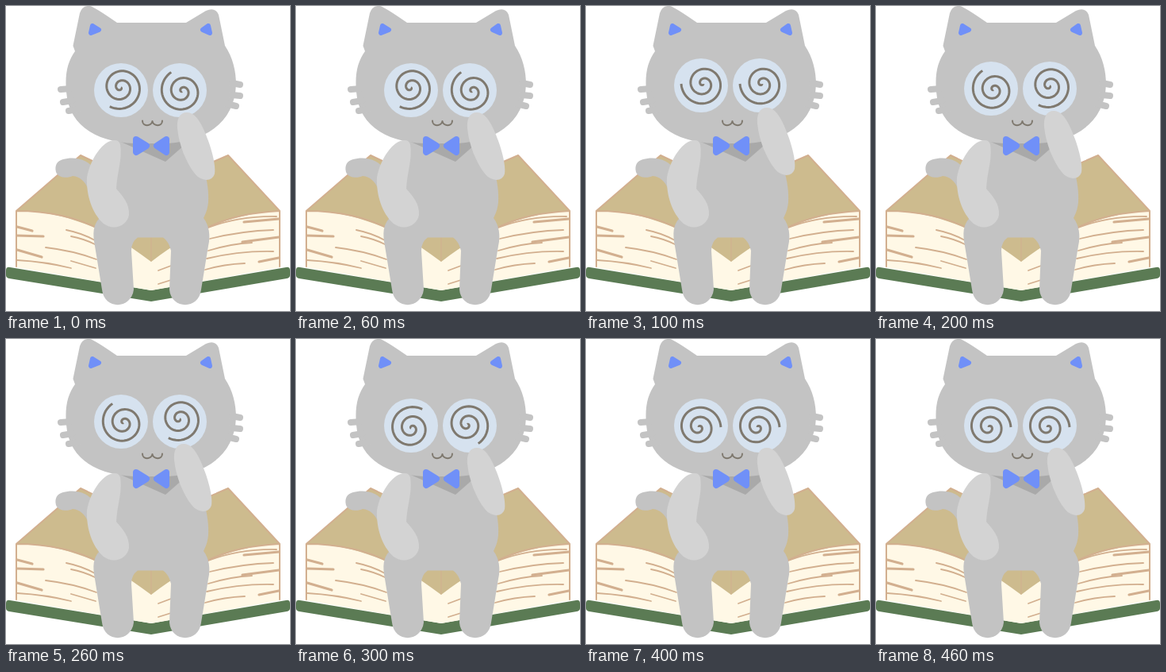
An HTML page that plays this animation: 358x384 px, repeating every 500 ms.

```html
<!DOCTYPE html>
<html lang="en">
<head>
<meta charset="utf-8">
<title>Dizzy cat</title>
<style>
  html, body { margin: 0; width: 100%; height: 100%; overflow: hidden; background: #fff; }
  svg { display: block; width: 358px; height: 384px; }
  .line { fill: none; stroke-linecap: round; stroke-linejoin: round; }
  .ink { stroke: #d2af8f; }
  .fur { fill: #c3c3c3; }
  .arm { fill: #d3d3d3; }
  .blue { fill: #7090f8; stroke: #7090f8; stroke-linejoin: round; }
</style>
</head>
<body>
<svg viewBox="0 0 358 384">
  <g id="book">
    <path fill="#5b7b54" d="M5 329L183 358L353 329Q358 328 358 333V339Q358 342 354 343L183 372L4 343Q0 342 0 339V333Q0 328 5 329Z"/>
    <path fill="#fff8e6" d="M13 258V329L183 358L345 329V258L183 250Z"/>
    <path fill="#cdbb8e" d="M94 188L13 258C58 258 117 271 183 322C240 277 298 260 345 258L280 188L183 230Z"/>
    <path class="line ink" stroke-width="2" d="M13 328V258L94 188L183 230L280 188L345 258V328M13 258C50 258 85 264 118 281M345 258C310 260 280 265 250 281"/>
    <path class="line ink" stroke-width="1" d="M183 250V321"/>
    <path class="line ink" stroke-width="1.8" d="M76 282Q96 286 112 295M82 290Q98 293 112 300M50 304Q85 308 114 319M14 320Q50 322 82 330M82 321L113 330
      M255 279Q295 264 341 265M257 293Q298 283 337 282M255 308Q285 299 310 298M253 318Q295 308 337 309M251 332Q275 325 301 324M192 333L208 327M192 350L208 345"/>
    <path class="line ink" stroke-width="3.2" d="M14 278L33 283M14 289L47 290M14 307L45 316M300 272L344 268M298 297L344 291M319 322L344 317"/>
  </g>
  <path class="fur" d="M72 193C86 189 103 192 114 208V245C103 236 103 216 84 214C78 217 66 217 63 209C61 201 64 195 72 193Z"/>
  <path class="fur" d="M140 165H232C246 188 257 222 255 247C254 257 251 263 249 267C256 276 258 289 255 302L246 357C243 383 208 382 206 357L208 308Q205 296 198 291.500H166Q158 297 158 308L161 357C158 382 124 383 121 357L112 302C109 286 110 276 117 268C106 235 116 195 140 165Z"/>
  <path fill="#a9a9a9" d="M138 168L201 196L233 168Z"/>
  <g class="fur">
    <path d="M87 57L84.500 50L93 9Q96 -1 106 0Q111 1 140 21H227L252 6Q264 1 268 11L276 50C286 65 290 82 290 99C288 150 246 176 184 173C125 176 80 158 76 108C74 84 78 70 87 57Z"/>
    <path class="line" stroke="#c3c3c3" stroke-width="8" d="M82 104L69 105M84 119L72 121M90 130L79 132M285 97L295 99M285 112L295 113M278 123L290 126"/>
  </g>
  <path class="blue" stroke-width="6" d="M109 25L117 30L107 34ZM255 25L248 30L257 34Z"/>
  <g id="eyes">
    <circle cx="145" cy="106" r="34" fill="#d6e2ef"/>
    <circle cx="219" cy="106" r="34" fill="#d6e2ef"/>
    <g fill="none" stroke="#7f796f" stroke-width="3">
      <path id="leftSpiral"/>
      <path id="rightSpiral"/>
    </g>
  </g>
  <path class="line" stroke="#7f796f" stroke-width="2" d="M172 144.500C172 152 183 152 184.500 145C186 152 197 152 197 144.500"/>
  <path class="blue" stroke-width="8" d="M164 168L177 176L164 184ZM202 168L190 176L202 184Z"/>
  <path class="arm" d="M137 169C122 169 106 193 102 216C101 237 108 261 123 274C137 284 153 276 155 263C156 249 147 239 139 230C140 209 147 193 144 174Q142 169 137 169Z"/>
  <path class="arm" id="paw" d="M228 134C219 134 215 142 216 154C218 175 227 197 238 211C246 221 260 222 263 211C265 199 257 171 247 151C242 141 236 134 228 134Z"/>
</svg>
<script>
const STEP = 100, POSES = 5;
// Paw offset per pose; the eyes follow its vertical part.
const PAW = [[0, 0], [0, -6], [-4, -2], [0, 3], [0, 3]];
const $ = id => document.getElementById(id);

// The coil sits off-centre in the lens; its outer end points right.
function spiral() {
  const points = [], turns = 2.3, gap = 12, outer = 27.75;
  for (let i = 0; i <= 120; i++) {
    const t = turns * i / 120, r = outer - gap * t, a = -2 * Math.PI * t;
    points.push((r * Math.cos(a) - 2.75).toFixed(2) + " " + (r * Math.sin(a) + 2).toFixed(2));
  }
  return "M" + points.join("L");
}

const left = $("leftSpiral"), right = $("rightSpiral");
for (const eye of [left, right]) eye.setAttribute("d", spiral());

function place(part, x, y, angle = 0) {
  part.setAttribute("transform", `translate(${x} ${y}) rotate(${angle})`);
}

function draw(now) {
  const pose = Math.floor(now / STEP) % POSES;
  const [dx, dy] = PAW[pose];
  place($("paw"), dx, dy);
  place($("eyes"), 0, dy);
  place(left, 145, 106, 120 + 60 * pose);
  place(right, 219, 106, 240 - 60 * pose);
}

let start;
function tick(now) {
  start ??= now;
  draw(now - start);
  requestAnimationFrame(tick);
}
draw(0);
requestAnimationFrame(tick);
</script>
</body>
</html>
```
